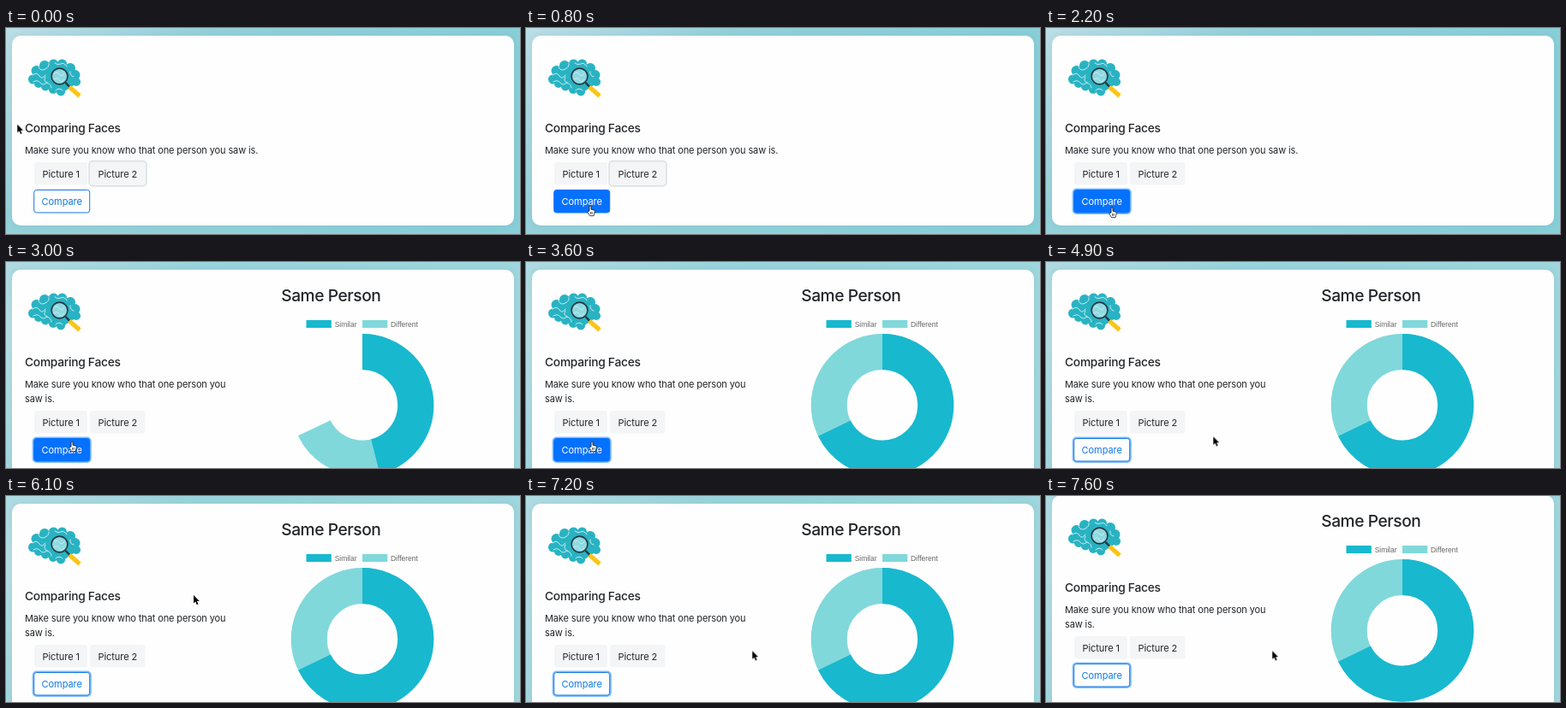
These frames come from a looping animation (600x241 px, 7700 ms). An HTML page:

```html
<!DOCTYPE html>
<html lang="en">
<head>
<meta charset="utf-8">
<title>Comparing Faces</title>
<style>
  @property --p { syntax: "<number>"; inherits: true; initial-value: 0; }

  html, body { margin: 0; width: 100%; height: 100%; overflow: hidden; }
  svg { display: block; width: 600px; height: 241px; }
  text { font-family: Inter, Roboto, sans-serif; font-size: 11px; letter-spacing: -.011em; fill: #212529; }
  .title { font-size: 13.75px; font-weight: 500; letter-spacing: -.0185em; }
  .result { font-size: 19.2px; font-weight: 500; letter-spacing: -.023em; }
  .legend text { font: 8.45px "Liberation Sans", Arial, sans-serif; letter-spacing: 0; fill: #666; }
  .button text { text-anchor: middle; letter-spacing: -.005em; }
  .light { fill: #f4f5f6; }
  .card { fill: #fefefe; filter: drop-shadow(0 0 4px rgba(0, 80, 100, .1)); }

  /* every part shares one 7.7 s clock */
  .early, .late, .drop, .scroll, .donut, .cursor, .hover, .idle, .ring-old, .ring-new {
    animation: 7.7s step-end infinite;
  }
  .early { animation-name: early; }
  .late { animation-name: late; }
  .drop { animation-name: drop; }
  .scroll { animation-name: scroll; }
  .donut { animation-name: grow; }
  .cursor { animation-name: move; }
  .hover { animation-name: hover; }
  .idle { animation-name: idle; }
  .ring-old { animation-name: blur; }
  .ring-new { animation-name: focus; }

  @keyframes early { 0% { visibility: visible; } 36.36%, 100% { visibility: hidden; } }
  @keyframes late { 0% { visibility: hidden; } 36.36%, 100% { visibility: visible; } }
  @keyframes drop { 0% { transform: none; } 36.36%, 100% { transform: translateY(17px); } }
  @keyframes hover { 0%, 49.35%, 100% { visibility: hidden; } 9.09% { visibility: visible; } }
  @keyframes idle { 0%, 49.35%, 100% { visibility: visible; } 9.09% { visibility: hidden; } }
  @keyframes blur { 0% { visibility: visible; } 25.97%, 100% { visibility: hidden; } }
  @keyframes focus { 0% { visibility: hidden; } 25.97%, 100% { visibility: visible; } }
  @keyframes scroll {
    0% { transform: translateY(0); }
    96.1% { transform: translateY(0); animation-timing-function: steps(3, start); }
    100% { transform: translateY(-10px); }
  }
  /* ease-out quart, sampled every 100 ms */
  @keyframes grow {
    0% { --p: 0; }
    36.36% { --p: .175; }
    37.66% { --p: .471; }
    38.96% { --p: .679; }
    40.25% { --p: .818; }
    41.55% { --p: .906; }
    42.85% { --p: .958; }
    44.15% { --p: .984; }
    45.45% { --p: .996; }
    46.75%, 100% { --p: 1; }
  }
  @keyframes move {
    0% { transform: translate(13.2px, 112.8px); }
    1.29% { transform: translate(13.2px, 112.8px); animation-timing-function: steps(8, start); }
    11.68% { transform: translate(75px, 208px); }
    14.28% { transform: translate(75px, 208px); animation-timing-function: steps(2, start); }
    16.88% { transform: translate(77px, 210px); }
    48.05% { transform: translate(77px, 210px); animation-timing-function: steps(7, start); }
    57.14% { transform: translate(195.3px, 204.3px); }
    64.93% { transform: translate(195.3px, 204.3px); animation-timing-function: steps(3, start); }
    68.83% { transform: translate(219px, 116px); }
    84.41% { transform: translate(219px, 116px); animation-timing-function: steps(4, start); }
    89.6% { transform: translate(268px, 192px); animation-timing-function: steps(1, start); }
    90.9%, 100% { transform: translate(264.2px, 181.3px); }
  }

  .donut circle { fill: none; stroke-width: 42px; }
  .total { stroke: #80d8da; stroke-dasharray: calc(var(--p) * 360px) 720px; }
  .similar { stroke: #18b8cf; stroke-dasharray: calc(var(--p) * 244px) 720px; }
</style>
</head>
<body>
<svg viewBox="0 0 600 241">
  <defs>
    <radialGradient id="wide" gradientUnits="userSpaceOnUse" cx="0" cy="0" r="600">
      <stop offset="0" stop-color="#bddee6"/>
      <stop offset=".4" stop-color="#95d1da"/>
      <stop offset="1" stop-color="#89cfd8"/>
    </radialGradient>
    <radialGradient id="tall" gradientUnits="userSpaceOnUse" cx="0" cy="80" r="600">
      <stop offset="0" stop-color="#b9dee5"/>
      <stop offset=".4" stop-color="#9ad4dc"/>
      <stop offset="1" stop-color="#a0d7de"/>
    </radialGradient>
  </defs>

  <rect class="early" width="600" height="241" fill="url(#wide)"/>
  <rect class="late" width="600" height="241" fill="url(#tall)"/>

  <g class="scroll">
    <rect class="early card" x="7" y="9" width="586" height="222" rx="10"/>
    <rect class="late card" x="7" y="9" width="586" height="300" rx="10"/>

    <!-- brain under a magnifying glass -->
    <g fill="#29b3c2">
      <path d="M33 54L46 43H70L81 55 79 67 64 77 44 69 32 62Z"/>
      <circle cx="31.500" cy="60" r="5.500"/><circle cx="35.500" cy="50" r="6"/>
      <circle cx="45" cy="44" r="6"/><circle cx="55.500" cy="42" r="5.500"/>
      <circle cx="65.500" cy="42" r="5.500"/><circle cx="75" cy="47" r="6"/>
      <circle cx="80.500" cy="55" r="6"/><circle cx="82" cy="63" r="5"/>
      <circle cx="64" cy="74.500" r="5"/><circle cx="55" cy="72" r="5"/>
      <circle cx="46" cy="68.500" r="5"/><circle cx="38" cy="65" r="5"/>
    </g>
    <g fill="none" stroke="#c9edf0" stroke-linecap="round">
      <path d="M31 55q5-4 8 1t7-1M38 46q3 5 8 2t4-6M32 63q5-3 8 1t8 0M46 57q-3 5 2 7t5 6M57 41q3 3 7 1t7 3M75 51q-1 5 4 6M58 73q4-4 8 0"/>
    </g>
    <circle cx="62.5" cy="56.5" r="9.4" fill="#8fd9e0" stroke="#263640" stroke-width="1.6"/>
    <path d="M56 54q3-4 6 0t6-1M56 60q4-3 6 1t6-1" fill="none" stroke="#c9edf0"/>
    <path d="M69.5 64L74 68.5" stroke="#263640" stroke-width="2.4"/>
    <path d="M74 69L86 79.5" stroke="#fcc414" stroke-width="5"/>

    <text class="title" x="22" y="122.4">Comparing Faces</text>
    <text class="early" x="22" y="147">Make sure you know who that one person you saw is.</text>
    <g class="late">
      <text x="22" y="147">Make sure you know who that one person you</text>
      <text x="22" y="164">saw is.</text>
    </g>

    <g class="button drop">
      <rect class="light" x="33" y="157" width="62" height="26.5" rx="3"/>
      <text x="64.2" y="174.6">Picture 1</text>
      <rect class="ring-old" x="97.2" y="155.8" width="66.6" height="29" rx="4" fill="none" stroke="#dde4e5" stroke-width="2"/>
      <rect class="light" x="98" y="157" width="64.5" height="26.5" rx="3"/>
      <text x="130.4" y="174.6">Picture 2</text>

      <rect class="ring-new" x="31.7" y="188.5" width="67" height="28.5" rx="4" fill="none" stroke="#80bdff" stroke-width="2.2"/>
      <g class="idle">
        <rect x="32.7" y="189.5" width="65" height="26.5" rx="3" fill="#fefefe" stroke="#1279e6"/>
        <text x="65.2" y="207.2" style="fill:#1279e6">Compare</text>
      </g>
      <g class="hover">
        <rect x="32.7" y="189.5" width="65" height="26.5" rx="3" fill="#0571ff" stroke="#0571ff"/>
        <text x="65.2" y="207.2" style="fill:#fff">Compare</text>
      </g>
    </g>

    <g class="late">
      <text class="result" x="321.2" y="45.6">Same Person</text>
      <g class="legend">
        <rect x="350.5" y="68" width="29.3" height="9" fill="#18b8cf"/>
        <text x="383.7" y="75.5">Similar</text>
        <rect x="416" y="68" width="29.3" height="9" fill="#80d8da"/>
        <text x="449" y="75.5">Different</text>
      </g>
      <g class="donut">
        <g transform="translate(416 167.4) rotate(-90)">
          <circle class="total" r="62.3" pathLength="360"/>
          <circle class="similar" r="62.3" pathLength="360"/>
        </g>
      </g>
    </g>
  </g>

  <g class="cursor" stroke-linejoin="round">
    <path class="idle" d="M0 0v9.6l2.2-2 1.6 3.6 1.6-.7L3.8 7h3Z" fill="#000" stroke="#fff" stroke-width=".9" paint-order="stroke"/>
    <g class="hover" stroke="#111" stroke-width=".8">
      <path d="M-1 6V1a1 1 0 0 1 2 0v3.2l3.4.9q.9.3.8 1.3l-.5 3-.7 2.3H-.5L-3 7.6q-.3-1.4.8-1.2Z" fill="#fff"/>
      <path d="M.6 7.200v2.600M2.200 7.200v2.600" fill="none"/>
    </g>
  </g>
</svg>
</body>
</html>
```
